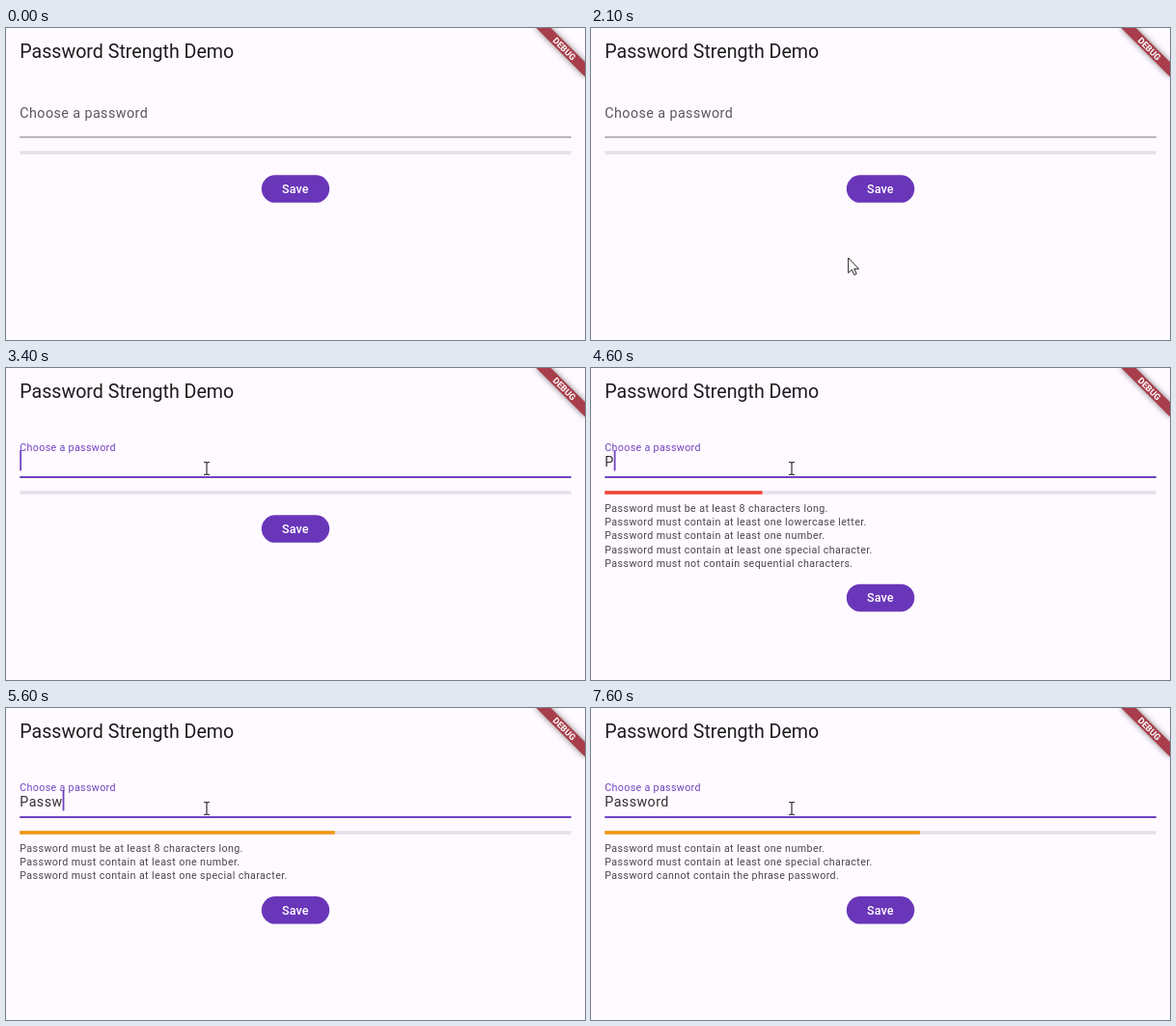
An HTML page that plays this animation: 600x323 px, repeating every 8000 ms.

```html
<!DOCTYPE html>
<html lang="en">
<head>
<meta charset="utf-8">
<title>Password Strength Demo</title>
<style>
  html, body { margin: 0; width: 100%; height: 100%; overflow: hidden; background: #fffaff; }
  svg { display: block; width: 100vw; height: 100vh; font-family: Roboto, "Open Sans", sans-serif; }
  text { white-space: pre; }
  .title { font-size: 19.63px; fill: #1d1b1e; }
  .field { font-size: 14.27px; letter-spacing: .446px; }
  .note { font-size: 10.7px; letter-spacing: .4px; fill: #49454e; }
  .save { font-size: 12.5px; font-weight: 500; letter-spacing: .09px; fill: #fff; text-anchor: middle; }
  .debug { font-size: 9.1px; font-weight: 700; fill: #fff; text-anchor: middle; }
</style>
</head>
<body>
<svg viewBox="0 0 600 323">
  <defs>
    <filter id="blur" x="-30%" y="-150%" width="160%" height="400%">
      <feGaussianBlur stdDeviation="3.2"/>
    </filter>
  </defs>
  <rect width="600" height="323" fill="#fffaff"/>
  <text class="title" x="14.27" y="30.6">Password Strength Demo</text>

  <g transform="translate(600 0) rotate(45)">
    <rect x="-35.7" y="25" width="71.4" height="10.7" fill="#000" opacity=".5" filter="url(#blur)"/>
    <rect x="-35.7" y="25" width="71.4" height="10.7" fill="#a83e4b"/>
    <text class="debug" x="0" y="33.6">DEBUG</text>
  </g>

  <text id="label" class="field">Choose a password</text>
  <text id="input" class="field" x="14.27" y="101.8" fill="#1d1b1e" fill-opacity=".9"></text>
  <rect id="caret" y="85" width="1.8" height="21.4" fill="#6f43c0"/>
  <line id="underline" x1="14.27" y1="113" x2="585.73" y2="113"/>

  <rect x="14.27" y="127.2" width="571.46" height="3.57" fill="#e6dfec"/>
  <rect id="bar" x="14.27" y="127.2" height="3.57"/>
  <g id="notes"></g>

  <g id="button">
    <rect x="264.8" y="152.3" width="70.4" height="28.5" rx="14.25" fill="#6936b9"/>
    <text class="save" x="299.8" y="170.9">Save</text>
  </g>

  <path id="arrow" d="M0 0V15.6L3.6 12.2L6.1 17.6L8.5 16.5L6.1 11.3H10.8Z"
        fill="#fff" stroke="#222" stroke-width="1" stroke-linejoin="round"/>
  <path id="beam" d="M-3 -6.5H-1L0 -5.5L1 -6.5H3M0 -5.5V5.5M-3 6.5H-1L0 5.5L1 6.5H3"
        fill="none" stroke="#333" stroke-width="1.2"/>
</svg>
<script>
const LOOP = 8000, STEP = 100, LEFT = 14.27, WIDTH = 571.46, LINE = 14.27;
const FOCUS = 3300, HOVER = 2900, BLINK = 500;
const $ = id => document.getElementById(id);
const mix = (a, b, k) => a + (b - a) * k;
const clamp = v => Math.min(1, Math.max(0, v));

// Pointer path: time, x, y
const path = [
  [100, 572, 96], [200, 492, 160], [300, 408, 222], [400, 348, 262], [500, 328, 273.5],
  [1600, 328, 273.5], [1900, 304, 262], [2200, 248, 226], [2500, 207, 190],
  [2700, 192.5, 156], [2800, 197, 132], [2900, 205, 110], [3000, 208, 104]
];
const word = 'Password';
const keyTimes = [4600, 4800, 5000, 5200, 5600, 5700, 5900, 6100];

const rules = [
  [s => s.length >= 8, 'must be at least 8 characters long.'],
  [s => /[A-Z]/.test(s), 'must contain at least one uppercase letter.'],
  [s => /[a-z]/.test(s), 'must contain at least one lowercase letter.'],
  [s => /\d/.test(s), 'must contain at least one number.'],
  [s => /[^\w]/.test(s), 'must contain at least one special character.'],
  [s => !/password/i.test(s), 'cannot contain the phrase password.'],
  [s => s.length > 3, 'must not contain sequential characters.']
];

const notes = rules.map((_, i) => {
  const el = document.createElementNS('http://www.w3.org/2000/svg', 'text');
  el.setAttribute('class', 'note');
  el.setAttribute('x', LEFT);
  el.setAttribute('y', 148.7 + i * LINE);
  return $('notes').appendChild(el);
});

function set(id, attrs) {
  for (const name in attrs) $(id).setAttribute(name, attrs[name]);
}

function pointerAt(t) {
  const i = path.findIndex(p => p[0] > t);
  if (i < 0) return path[path.length - 1].slice(1);
  if (i === 0) return null;
  const [t0, x0, y0] = path[i - 1], [t1, x1, y1] = path[i];
  const k = (t - t0) / (t1 - t0);
  return [mix(x0, x1, k), mix(y0, y1, k)];
}

function drawPointer(t) {
  const pos = pointerAt(t), inField = t >= HOVER;
  set('arrow', { visibility: pos && !inField ? 'visible' : 'hidden' });
  set('beam', { visibility: pos && inField ? 'visible' : 'hidden' });
  if (pos) set(inField ? 'beam' : 'arrow', { transform: `translate(${pos})` });
}

function drawField(t, text) {
  const focused = t >= FOCUS;
  const k = focused ? clamp((t - FOCUS + 60) / 160) : 0;
  set('label', {
    transform: `translate(${LEFT} ${mix(92.9, 85.9, k)}) scale(${mix(1, 0.75, k)})`,
    fill: focused ? '#6f43c0' : '#59555e'
  });
  set('underline', {
    stroke: focused ? '#6f43c0' : t >= HOVER ? '#1d1b1e' : '#7b757f',
    'stroke-width': focused ? 1.8 : 1.1
  });
  $('input').textContent = text;
  const start = text ? keyTimes[text.length - 1] : FOCUS - 100;
  const lit = focused && Math.floor((t - start) / BLINK) % 2 === 0;
  set('caret', {
    visibility: lit ? 'visible' : 'hidden',
    x: LEFT + (text ? $('input').getComputedTextLength() : 0)
  });
}

function drawStrength(text) {
  const failed = text ? rules.filter(([ok]) => !ok(text)) : [];
  const score = text ? 1 - failed.length / rules.length : 0;
  set('bar', { width: WIDTH * score, fill: score < 0.33 ? '#f44336' : '#f39513' });
  notes.forEach((el, i) => {
    el.textContent = failed[i] ? 'Password ' + failed[i][1] : '';
  });
  set('button', { transform: `translate(0 ${failed.length * LINE})` });
}

function draw(ms) {
  const t = Math.floor(ms % LOOP / STEP) * STEP;
  const text = word.slice(0, keyTimes.filter(k => k <= t).length);
  drawPointer(t);
  drawField(t, text);
  drawStrength(text);
}

let origin;
function tick(now) {
  origin ??= now;
  draw(now - origin);
  requestAnimationFrame(tick);
}
draw(0);
requestAnimationFrame(tick);
</script>
</body>
</html>
```
